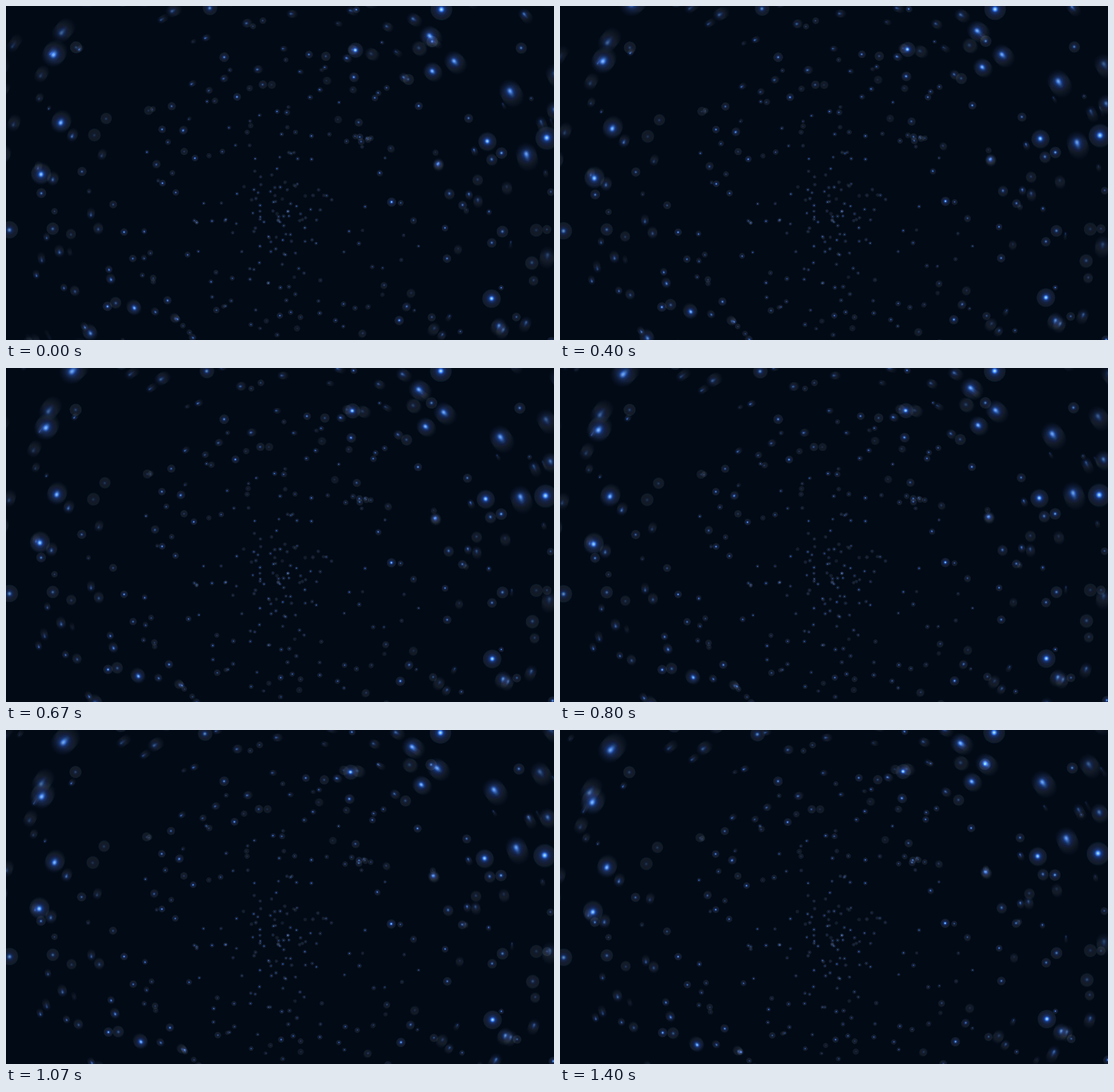
Write an HTML page with a canvas that moves like this. It is 958 by 585 pixels and loops after 1540 ms.

```html
<!DOCTYPE html>
<html lang="en">
<head>
<meta charset="utf-8">
<title>Turning stars</title>
<style>
  html, body { margin: 0; width: 100%; height: 100%; overflow: hidden; background: #020a16; }
  canvas { display: block; }
</style>
</head>
<body>
<canvas id="sky" width="958" height="585"></canvas>
<script>
const W = 958, H = 585, CX = 479, CY = 372, LOOP = 1540;
const COUNT = 560, TRAIL = 18, DECAY = 0.84, TRAIL_STEP = 1 / 84;
const ctx = document.getElementById('sky').getContext('2d');

// Brightest stars: start x, start y, turn over one loop in radians
const BRIGHT = [
  [82, 87, .101], [95, 206, .093], [841, 236, .044], [909, 257, .166],
  [945, 230, .032], [849, 512, .017], [782, 95, .134], [744, 113, .094],
  [739, 51, .121], [761, 6, .006], [610, 77, .037], [225, 530, .091],
  [61, 296, .057], [674, 343, .025], [880, 147, .15], [140, -17, .147]
];

// Moments at which the held picture moves on, in ticks of 1/15 s
const TICKS = [0, 1, 2, 3, 5, 6, 7, 8, 10, 12, 13, 14, 15, 16, 19, 21];

let seed = 4217;
function rand(min, max) {
  seed = (seed + 0x6D2B79F5) | 0;
  let n = Math.imul(seed ^ (seed >>> 15), 1 | seed);
  n = (n + Math.imul(n ^ (n >>> 7), 61 | n)) ^ n;
  return min + (max - min) * ((n ^ (n >>> 14)) >>> 0) / 4294967296;
}

function makeSprite() {
  const c = document.createElement('canvas');
  c.width = c.height = 100;
  const g = c.getContext('2d');
  const fill = g.createRadialGradient(50, 50, 0, 50, 50, 50);
  fill.addColorStop(0, 'rgb(190, 225, 255)');
  fill.addColorStop(0.08, 'rgb(130, 190, 255)');
  fill.addColorStop(0.18, 'rgb(45, 105, 215)');
  fill.addColorStop(0.3, 'rgb(13, 36, 90)');
  fill.addColorStop(0.55, 'rgb(4, 12, 34)');
  fill.addColorStop(1, 'rgb(0, 0, 0)');
  g.fillStyle = fill;
  g.arc(50, 50, 50, 0, Math.PI * 2);
  g.fill();
  return c;
}

function brightStar([x, y, turn]) {
  const r = Math.hypot(x - CX, y - CY);
  return { r, turn, angle: Math.atan2(y - CY, x - CX), size: r / 12, alpha: 1 };
}

// Farther stars may be larger and faster
function fieldStar() {
  const r = rand(3, 650);
  return {
    r, turn: rand(0, r) / 2700, angle: rand(0, Math.PI * 2),
    size: rand(6, Math.max(7, r / 15)), alpha: rand(0.15, 0.85)
  };
}

const sprite = makeSprite();
const stars = [...BRIGHT.map(brightStar), ...Array.from({ length: COUNT }, fieldStar)];

function drawStar({ r, turn, angle, size, alpha }, progress) {
  for (let k = 0; k < TRAIL; k++) {
    const a = angle - turn * (progress - k * TRAIL_STEP);
    const x = CX + r * Math.cos(a) - size / 2;
    const y = CY + r * Math.sin(a) - size / 2;
    if (x > W || y > H || x < -size || y < -size) continue;
    ctx.globalAlpha = alpha * (1 - DECAY) * DECAY ** k;
    ctx.drawImage(sprite, x, y, size, size);
  }
}

function render(progress) {
  ctx.globalCompositeOperation = 'source-over';
  ctx.globalAlpha = 1;
  ctx.fillStyle = '#020a16';
  ctx.fillRect(0, 0, W, H);
  ctx.globalCompositeOperation = 'lighter';
  for (const star of stars) drawStar(star, progress);
}

let shown = -1;
function frame() {
  // Changes fall on whole hundredths of a second
  const time = performance.now() % LOOP;
  const start = TICKS.findLast(n => Math.round(n * 100 / 15) * 10 <= time);
  if (start !== shown) {
    shown = start;
    render(start / 21);
  }
  requestAnimationFrame(frame);
}
frame();
</script>
</body>
</html>
```
